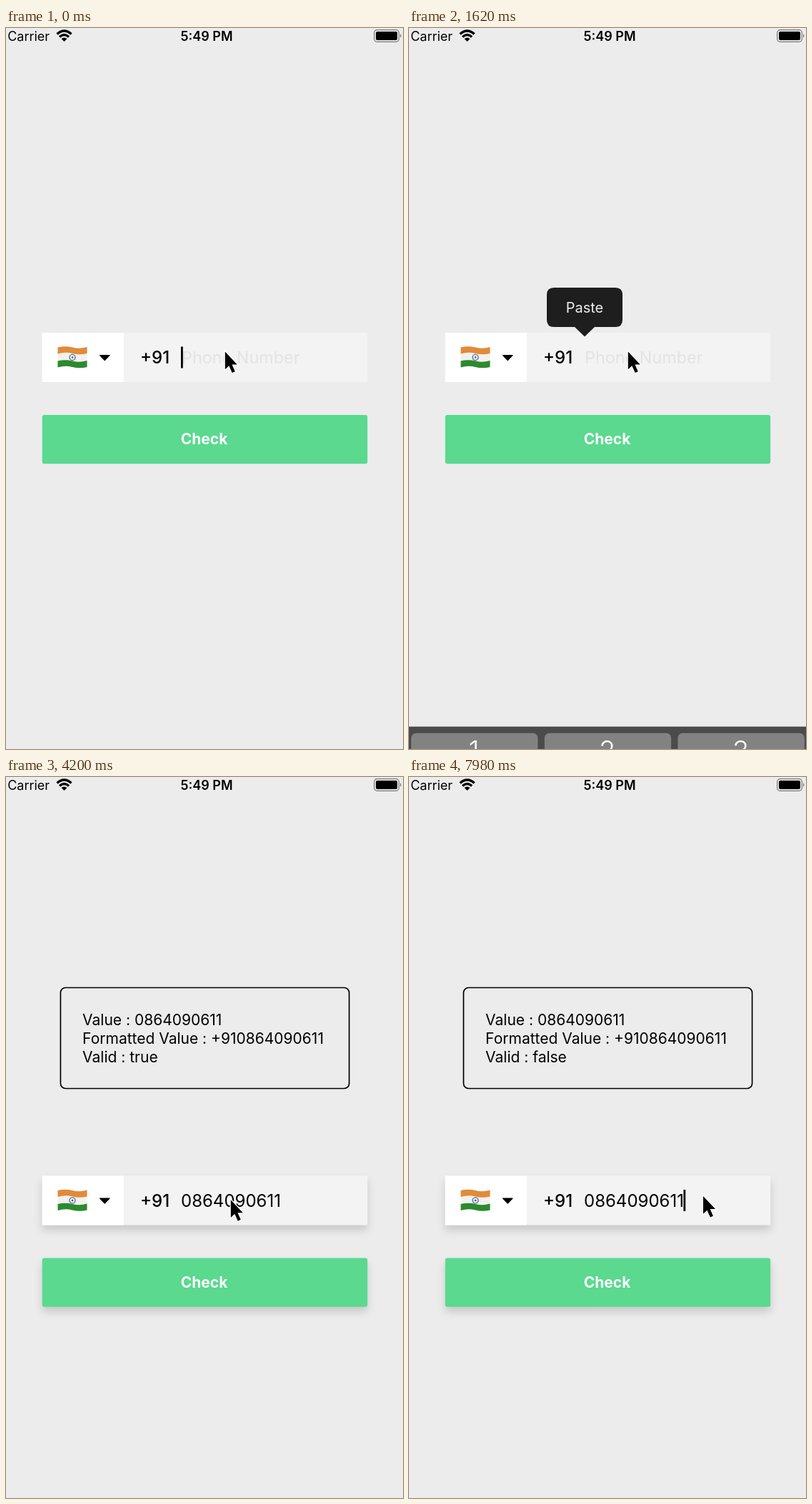
These frames come from a looping animation (556 px wide and 1008 px high, 8 s). An HTML page:

```html
<!DOCTYPE html>
<html lang="en">
<head>
<meta charset="utf-8">
<title>Phone input</title>
<style>
  html, body { margin: 0; width: 100%; height: 100%; overflow: hidden; background: #ececec; }
  svg { display: block; width: 556px; height: 1008px; font-family: Inter, Roboto, sans-serif; }
  text { white-space: pre; }
  .mid { text-anchor: middle; }
  .raised { filter: drop-shadow(0 7px 6px rgba(0, 0, 0, .15)); }
</style>
</head>
<body>
<svg viewBox="0 0 556 1008">
  <rect width="556" height="1008" fill="#ececec"/>

  <g id="status">
    <text x="2.200" y="17.500" font-size="18">Carrier</text>
    <g fill="none" stroke="#000" stroke-width="3.400">
      <path d="M71.500 8.500Q81.500 -.3 91.500 8.500"/>
      <path d="M75 12.500Q81.500 6.500 88 12.500"/>
    </g>
    <path d="M77.500 15Q81.500 11.800 85.500 15L81.500 19Z"/>
    <text class="mid" x="281" y="17.500" font-size="18" font-weight="600">5:49 PM</text>
    <rect x="515.700" y="2.700" width="34.600" height="16.600" rx="4" fill="none" stroke="#777" stroke-width="1.200"/>
    <rect x="518" y="5" width="30" height="12" rx="2"/>
    <path d="M552 8Q555 11 552 14Z" fill="#777"/>
  </g>

  <g id="result">
    <rect id="frame" y="294.500" height="141" rx="7" fill="none" stroke="#000" stroke-width="1.700"/>
    <g font-size="21">
      <text id="value" y="346.500"/>
      <text id="formatted" y="372.500"/>
      <text id="valid" y="398.500"/>
    </g>
  </g>

  <g id="form">
    <g id="panels">
      <rect x="50.700" y="426" width="455.500" height="69" fill="#f3f3f3"/>
      <rect x="50.700" y="541" width="455.500" height="68.300" rx="3" fill="#5ad98f"/>
    </g>
    <rect x="50.700" y="426" width="114" height="69" fill="#fff"/>
    <g id="flag">
      <path d="M72.500 446.500Q83 443.800 93 446.500T113.500 446V474Q103 476.700 93 474T72.500 474.500Z" fill="#f1f1ef"/>
      <path d="M72.500 446.500Q83 443.800 93 446.500T113.500 446V455Q103 457.700 93 455T72.500 455.500Z" fill="#e18b38"/>
      <path d="M72.500 465.500Q83 462.800 93 465.500T113.500 465V474Q103 476.700 93 474T72.500 474.500Z" fill="#2b8a2e"/>
      <circle cx="93" cy="460.500" r="4" fill="none" stroke="#3c5a8c" stroke-width="1.200"/>
      <circle cx="93" cy="460.500" r="1.300" fill="#3c5a8c"/>
    </g>
    <path d="M131.500 457.500H145L138.200 464.500Z" stroke="#000" stroke-width="1.200" stroke-linejoin="round"/>
    <text x="188" y="469" font-size="24" font-weight="500">+91</text>
    <text id="hint" x="246" y="469" font-size="23.400" fill="#e3e3e3">Phone Number</text>
    <text id="number" x="245" y="469" font-size="24"/>
    <rect id="caret" y="445.500" width="2.800" height="30"/>
    <text class="mid" x="277.500" y="582" font-size="21" font-weight="700" fill="#fff">Check</text>
  </g>

  <g id="bubble">
    <path d="M203 363H289Q299 363 299 373V408Q299 418 289 418H260L246 431.500L232 418H203Q193 418 193 408V373Q193 363 203 363Z" fill="#1e1e1e"/>
    <text class="mid" x="246" y="398" font-size="20" fill="#eee">Paste</text>
  </g>

  <g id="keyboard">
    <rect y="681" width="556" height="330" fill="#4b4b4b"/>
    <g id="keys" fill="#fff"/>
    <g fill="none" stroke="#fff" stroke-width="2.300" stroke-linecap="round" stroke-linejoin="round">
      <path d="M462 956.500H482Q486 956.500 486 960.500V975.500Q486 979.500 482 979.500H462L452.500 968Z"/>
      <path d="M468.500 963.500L477.500 972.500M477.500 963.500L468.500 972.500"/>
    </g>
  </g>

  <g id="pointer">
    <g id="ring" fill="none">
      <circle r="40" stroke="#fff" stroke-width="5"/>
      <circle r="39.500" stroke="#000" stroke-width="2.600"/>
    </g>
    <path transform="scale(1.050)" d="M.3 .5V24L5.500 19.200L9.700 28.500L13.600 26.800L9.500 17.700H16.500Z" stroke="#fff" stroke-width="2.400" paint-order="stroke"/>
  </g>
</svg>
<script>
const LOOP = 8000, STEP = 60, SHIFT = 131.5;
const NUMBER = '0864090611';
const CHECKED = 3840, RECHECKED = 6840;

// [time, digits in the field]
const edits = [[0, 0], [2460, 1], [2640, 2]];
for (let n = 3; n <= 10; n++) edits.push([2760 + (n - 3) * 84, n]);
edits.push([5040, 9], [5340, 8], [7560, 9], [7920, 10]);

// [start, end, x, y]
const moves = [
  [3480, 3780, 314.5, 590.7],
  [4320, 4740, 402, 594],
  [6240, 6780, 389.7, 703.8],
  [7020, 7440, 411.7, 585.5],
];
const clicks = [[3780, 3900], [4740, 4860], [6840, 6960], [7440, 7500]];
const focused = [[0, CHECKED], [4740, 6960], [7440, LOOP]];

const $ = id => document.getElementById(id);
const clamp = v => Math.min(1, Math.max(0, v));
const progress = (t, a, b) => clamp((t - a) / (b - a));
const within = (t, spans) => spans.some(([a, b]) => t >= a && t < b);
const smooth = p => p * p * (3 - 2 * p);
const show = (id, on) => $(id).setAttribute('visibility', on ? 'visible' : 'hidden');

function buildKeys() {
  const letters = ['', 'ABC', 'DEF', 'GHI', 'JKL', 'MNO', 'PQRS', 'TUV', 'WXYZ'];
  const key = (label, sub, col, row) => {
    const x = 3 + col * 186.7, y = 690 + row * 81.7, cx = x + 88;
    return `<rect x="${x}" y="${y + 2}" width="177.500" height="70" rx="7" fill="#333"/>
      <rect x="${x}" y="${y}" width="177.500" height="70" rx="7" fill="#828282"/>
      <text class="mid" x="${cx}" y="${y + (label === '0' ? 47.5 : 38)}" font-size="38" font-weight="300">${label}</text>
      <text class="mid" x="${cx + 1.5}" y="${y + 59}" font-size="15" font-weight="600" letter-spacing="3">${sub}</text>`;
  };
  $('keys').innerHTML = letters.map((s, i) => key(String(i + 1), s, i % 3, Math.floor(i / 3))).join('')
    + key('0', '', 1, 3);
}

function pointerAt(t) {
  let x = 306.5, y = 452;
  for (const [a, b, toX, toY] of moves) {
    const p = smooth(progress(t, a, b));
    x += (toX - x) * p;
    y += (toY - y) * p;
  }
  return [x, y];
}

function caretOpacity(t, lastEdit) {
  if (!within(t, focused)) return 0;
  const reset = t >= RECHECKED ? Math.max(RECHECKED, lastEdit) : lastEdit;
  const phase = (t - reset) % 900;
  return 1 - progress(phase, 430, 480) + progress(phase, 820, 880);
}

function drawResult(t, digits) {
  const left = 76.4 + (10 - digits.length) * 4.9;
  const lines = {
    value: 'Value : ' + digits,
    formatted: 'Formatted Value : +91' + digits,
    valid: 'Valid : ' + (t < RECHECKED),
  };
  show('result', t >= CHECKED);
  $('frame').setAttribute('x', left);
  $('frame').setAttribute('width', 2 * (278.5 - left));
  for (const id in lines) {
    $(id).setAttribute('x', left + 30.7);
    $(id).textContent = lines[id];
  }
}

function draw(t) {
  const [lastEdit, count] = edits.filter(e => e[0] <= t).pop();
  const digits = NUMBER.slice(0, count);

  drawResult(t, digits);
  $('form').setAttribute('transform', `translate(0 ${t >= CHECKED ? SHIFT : 0})`);
  $('panels').setAttribute('class', t >= CHECKED ? 'raised' : '');
  $('number').textContent = digits;
  show('hint', !count);
  $('caret').setAttribute('x', 245 + (count ? $('number').getComputedTextLength() - .5 : 0));
  $('caret').setAttribute('opacity', caretOpacity(t, lastEdit));

  $('bubble').setAttribute('opacity', progress(t, 365, 480) * (1 - progress(t, 2400, 2520)));

  const up = 1 - (1 - progress(t, 20, 490)) ** 3;
  const down = smooth(progress(t, 1380, 1680));
  $('keyboard').setAttribute('transform', `translate(0 ${330 * (1 - up + down)})`);

  $('pointer').setAttribute('transform', `translate(${pointerAt(t)})`);
  show('ring', within(t, clicks));
}

buildKeys();
const start = performance.now();
function tick() {
  const t = (performance.now() - start) % LOOP;
  draw(Math.floor(t / STEP) * STEP);
  requestAnimationFrame(tick);
}
tick();
</script>
</body>
</html>
```
